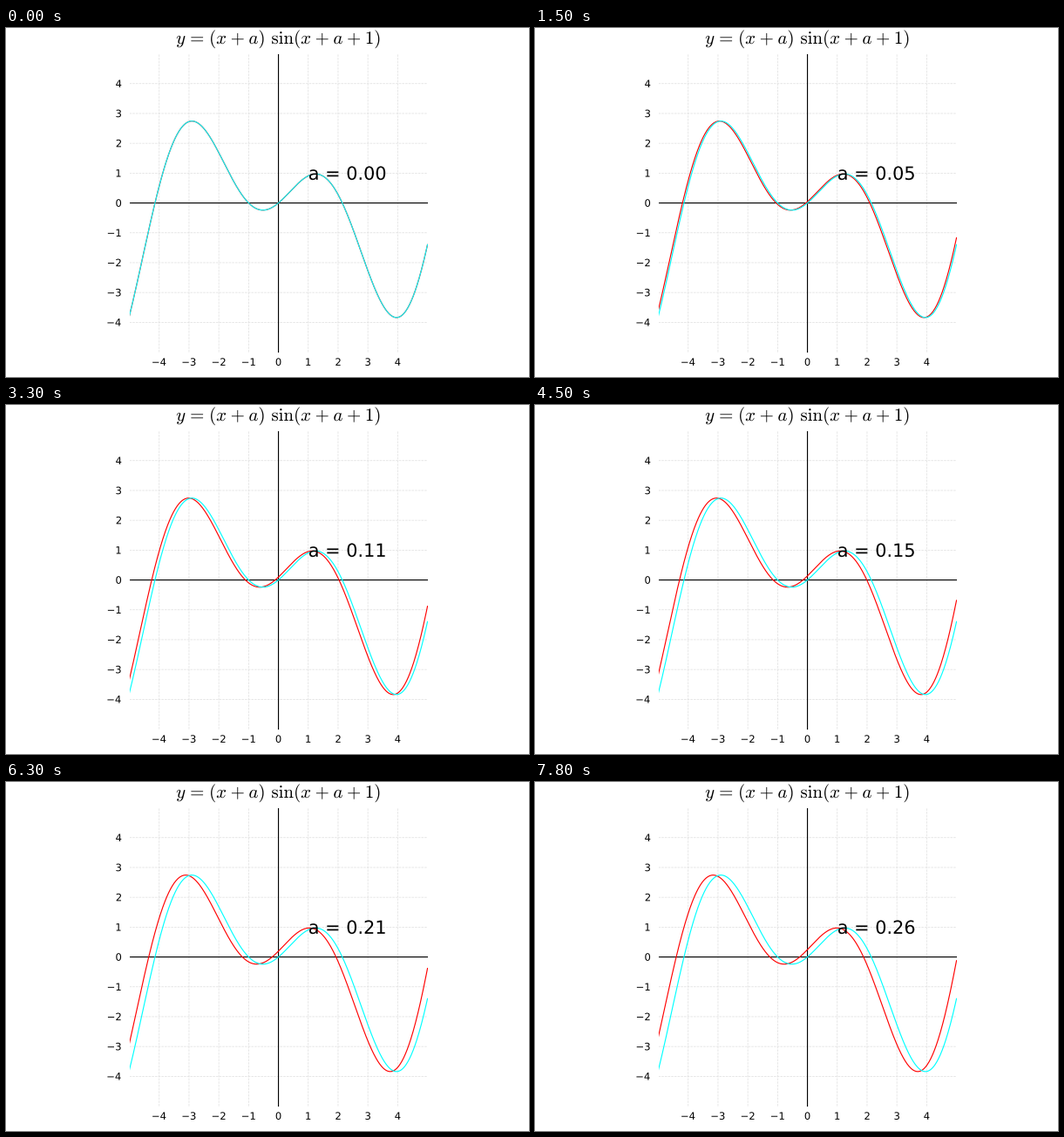
Recreate the animation shown at these times as a matplotlib script. Size 600 by 400 pixels, loop 8000 ms.

```python
import numpy as np
import matplotlib.pyplot as plt
from matplotlib.animation import FuncAnimation
from matplotlib.patches import PathPatch
from matplotlib.path import Path
from matplotlib.textpath import TextPath

plt.rcParams["font.family"] = "DejaVu Sans"
plt.rcParams["mathtext.fontset"] = "cm"
plt.rcParams["path.snap"] = False

WIDTH, HEIGHT, DPI = 600, 400, 100
CENTER_X, CENTER_Y, UNIT = 312.55, 200.55, 34.2
LEFT, BOTTOM, SIDE = CENTER_X - 5 * UNIT, CENTER_Y + 5 * UNIT, 10 * UNIT
TICK_SIZE, TEXT_SIZE = 11.57, 20.83
FRAME_MS, LOOP_MS = 100, 8000
FRAMES_PER_STEP, STEP = 3, 0.01

fig = plt.figure(figsize=(WIDTH / DPI, HEIGHT / DPI), dpi=DPI, facecolor="white")
ax = fig.add_axes([LEFT / WIDTH, 1 - BOTTOM / HEIGHT,
                   SIDE / WIDTH, SIDE / HEIGHT])
ax.set(xlim=(-5, 5), ylim=(-5, 5), xticks=range(-4, 5), yticks=range(-4, 5))
ax.spines[:].set_visible(False)
ax.tick_params(length=0, labelbottom=False, labelleft=False)
ax.set_axisbelow(True)
ax.grid(color="#dddddd", linestyle="--", linewidth=0.5)
ax.axhline(0, color="black", linewidth=0.83)
ax.axvline(0, color="black", linewidth=0.83)

# Text is drawn as outlines on a layer measured in pixels from the top left.
layer = fig.add_axes([0, 0, 1, 1])
layer.set(xlim=(0, WIDTH), ylim=(HEIGHT, 0))
layer.axis("off")


def outline(text, x, baseline, size, align=0.0):
    path = TextPath((0, 0), text, size=size)
    box = path.get_extents()
    shift = align * (box.x0 + box.x1)
    return Path(path.vertices * [1, -1] + [x - shift, baseline], path.codes)


def draw_text(*args):
    return layer.add_patch(PathPatch(outline(*args), facecolor="black", linewidth=0))


def space(em):
    """TeX math space; mathtext measures \\hspace in widths of an italic m."""
    return rf"\hspace{{{em / 0.878:.3f}}}"


plus = space(4 / 18) + "{+}" + space(4 / 18)
equals = space(0.1) + "=" + space(0.1)
title = rf"$y{equals}(x{plus}a){space(1 / 3)}\sin(x{plus}a{plus}1)$"
draw_text(title, CENTER_X - 0.5, 18, TEXT_SIZE, 0.5)

for n in range(-4, 5):
    name = str(n).replace("-", "\u2212")
    draw_text(name, CENTER_X + n * UNIT, BOTTOM + 15.3, TICK_SIZE, 0.5)
    draw_text(name, LEFT - 8.7, CENTER_Y - n * UNIT + 4.2, TICK_SIZE, 1.0)

x = np.linspace(-5, 5, 500)


def curve(a):
    return (x + a) * np.sin(x + a + 1)


def label_path(a):
    return outline(f"a = {a:.2f}", CENTER_X + UNIT, CENTER_Y - 0.78 * UNIT, TEXT_SIZE)


moving, = ax.plot(x, curve(0), color="red", linewidth=0.83)
ax.plot(x, curve(0), color="cyan", linewidth=0.83)
label = layer.add_patch(PathPatch(label_path(0), facecolor="black", linewidth=0))


def update(i):
    a = (i // FRAMES_PER_STEP) * STEP
    moving.set_ydata(curve(a))
    label.set_path(label_path(a))
    return moving, label


anim = FuncAnimation(fig, update, frames=LOOP_MS // FRAME_MS,
                     interval=FRAME_MS, repeat=True, repeat_delay=0)
plt.show()
```
